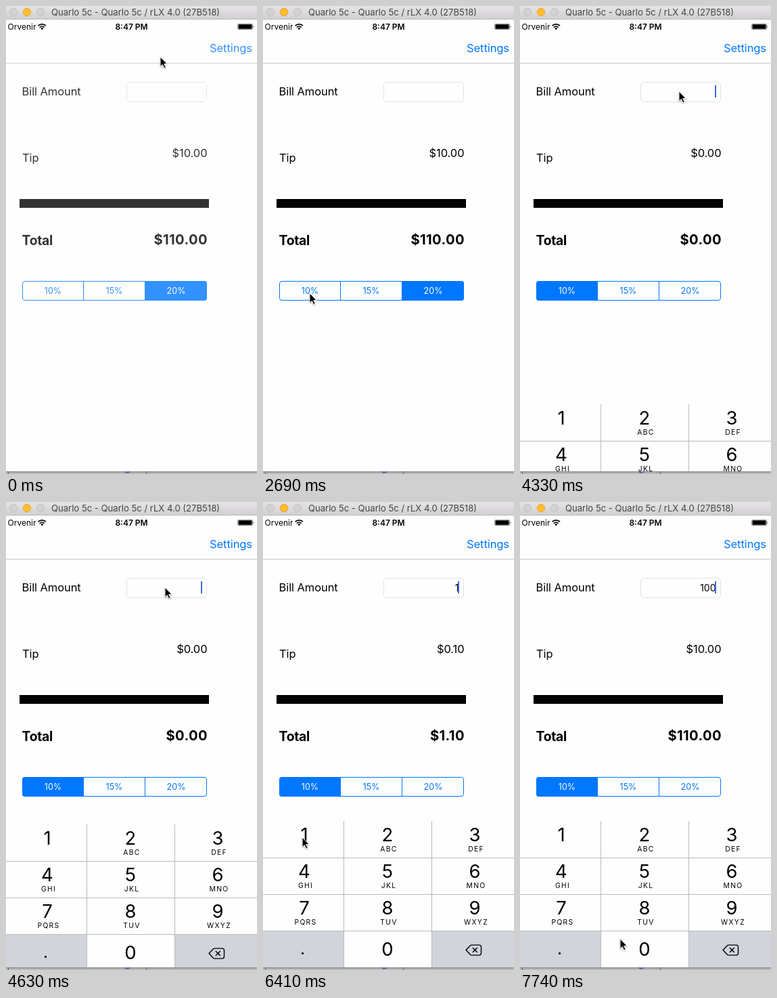
Write an HTML page that moves like this. It is 371 px wide and 691 px high and loops after 8 s.

```html
<!DOCTYPE html>
<html lang="en">
<head>
<meta charset="utf-8">
<title>Tip calculator</title>
<style>
  html, body { margin: 0; width: 100%; height: 100%; overflow: hidden; background: #fefefe; }
  svg { display: block; width: 371px; height: 691px; font-family: Inter, "Liberation Sans", sans-serif; }
  .label { font-size: 16.5px; letter-spacing: -.005em; }
  .total { font-size: 19.4px; font-weight: 700; letter-spacing: -.3px; }
  .sum { font-size: 20.2px; font-weight: 700; letter-spacing: .35px; }
  .end { text-anchor: end; }
  .mid, #segments text, #keys text { text-anchor: middle; }
  #segments text { font-size: 12.6px; }
  .digit { font-size: 27.5px; }
  .letters { font-size: 10.3px; letter-spacing: 1.3px; }
  #cursor { filter: drop-shadow(0 1px 1px rgba(0, 0, 0, .35)); }
</style>
</head>
<body>
<svg viewBox="0 0 371 691">
  <defs>
    <linearGradient id="chrome" x2="0" y2="1">
      <stop stop-color="#e6e4e6"/><stop offset="1" stop-color="#d0ced0"/>
    </linearGradient>
    <linearGradient id="desk" x2="0" y2="1">
      <stop stop-color="#8e8e8e"/><stop offset="1" stop-color="#c6c6c6"/>
    </linearGradient>
    <clipPath id="screen"><path d="M0 20H371V687H0z"/></clipPath>
    <clipPath id="pill"><rect x="24" y="406" width="273" height="29" rx="4"/></clipPath>
  </defs>
  <rect width="371" height="691" fill="#fefefe"/>

  <!-- window bar -->
  <rect width="371" height="20" fill="url(#chrome)"/>
  <path d="M0 19.5H371" stroke="#bcbabc"/>
  <g stroke-width=".8">
    <circle cx="11" cy="9" r="5.8" fill="#d3d1d3" stroke="#bdbbbd"/>
    <circle cx="31" cy="9" r="5.8" fill="#fdbc2e" stroke="#e0a127"/>
    <circle cx="51" cy="9" r="5.8" fill="#d3d1d3" stroke="#bdbbbd"/>
  </g>
  <text class="mid" x="191.5" y="14" font-size="13.1" fill="#454545">Quarlo 5c - Quarlo 5c / rLX 4.0 (27B518)</text>

  <!-- status bar -->
  <text x="2.5" y="35" font-size="12">Orvenir</text>
  <g fill="none" stroke="#000" stroke-width="1.7">
    <path d="M47.6 29.2a8 8 0 0 1 11.4 0M49.8 31.6a5 5 0 0 1 7 0"/>
    <path d="M53.3 35.2l-2-2.2a3 3 0 0 1 4 0z" fill="#000" stroke="none"/>
  </g>
  <text class="mid" x="185.5" y="34.5" font-size="12" font-weight="600">8:47 PM</text>
  <rect x="342.5" y="26.5" width="22" height="8" rx="1.5" fill="none" stroke="#000" stroke-opacity=".45"/>
  <rect x="343.5" y="27.3" width="20" height="6.4" rx=".8"/>
  <path d="M365.7 28.7q1.6 1.8 0 3.6z"/>

  <g id="content">
    <path d="M0 84.5H371" stroke="#c8c8c8"/>
    <text class="label end" x="364" y="68" fill="#0077ff">Settings</text>
    <text class="label" x="23.5" y="132">Bill Amount</text>
    <rect x="178.5" y="112.5" width="118" height="29" rx="4.5" fill="#fefefe" stroke="#e2e2e2"/>
    <text id="bill" class="end" x="289.5" y="131.5" font-size="14"></text>
    <rect id="caret" x="288" y="117" width="2" height="18" fill="#4168e8"/>
    <text class="label" x="24" y="230">Tip</text>
    <text id="tip" class="label end" x="297.5" y="222.5"></text>
    <rect x="20" y="285" width="280" height="13"/>
    <text class="total" x="23.5" y="353">Total</text>
    <text id="total" class="sum end" x="297.9" y="351.5"></text>
    <g id="segments">
      <g id="fills" clip-path="url(#pill)" fill="#0077ff"></g>
      <rect x="24.5" y="406.5" width="272" height="28" rx="3.5" fill="none" stroke="#0077ff"/>
      <path d="M114.5 406V435M205.5 406V435" stroke="#0077ff"/>
    </g>
  </g>

  <g clip-path="url(#screen)"><g id="keyboard">
    <rect y="471" width="371" height="216" fill="#fefefe"/>
    <path d="M0 633H119V687H0zM250 633H371V687H250z" fill="#d1d4db"/>
    <g id="keys"></g>
    <path d="M119.5 471V687M249.5 471V687M0 525.5H371M0 579.5H371M0 633.5H371" stroke="#b9babd"/>
    <path d="M300 661.5l6.3-6.5q.9-.9 2.2-.9h11q3 0 3 3v9q0 3-3 3h-11q-1.3 0-2.2-.9zM309.8 658l7 7M316.8 658l-7 7"
      fill="none" stroke="#000" stroke-width="1.4" stroke-linejoin="round"/>
  </g></g>

  <!-- strip of desktop below the window -->
  <rect y="687" width="371" height="4" fill="url(#desk)"/>
  <path d="M3.5 687V691M207.5 687V691" stroke="#666"/>
  <path d="M176 688q4 2 7-.5" fill="none" stroke="#5a3fb5" stroke-width="1.4"/>

  <path id="cursor" d="M0 0V14.6L3.3 11.5L5.8 16.8L8.2 15.7L5.7 10.6H10.2z" stroke="#fff"/>
</svg>
<script>
const LOOP = 8000, TICK = 149;
const $ = id => document.getElementById(id);

function add(parent, tag, attrs, text = '') {
  const node = document.createElementNS('http://www.w3.org/2000/svg', tag);
  for (const name in attrs) node.setAttribute(name, attrs[name]);
  node.textContent = text;
  parent.append(node);
  return node;
}

const segments = [[24, 114], [114, 205], [205, 297]].map(([left, right], i) => ({
  fill: add($('fills'), 'rect', { x: left, y: 406, width: right - left, height: 29 }),
  label: add($('segments'), 'text', { x: (left + right) / 2 + .5, y: 425 }, ['10%', '15%', '20%'][i]),
}));

// Number pad, three columns with slightly different widths
const columns = [[0, 119, 61], [120, 129, 184], [250, 121, 313]];
const letters = ['', 'ABC', 'DEF', 'GHI', 'JKL', 'MNO', 'PQRS', 'TUV', 'WXYZ'];
const pressed = {};
function addKey(digit, column, row, caption) {
  const [x, width, center] = columns[column], y = 471 + row * 54;
  pressed[digit] = add($('keys'), 'rect', { x, y, width, height: 54, fill: '#d1d4db', opacity: 0 });
  add($('keys'), 'text', { class: 'digit', x: center, y: y + (row < 3 ? 30 : 37) }, digit);
  add($('keys'), 'text', { class: 'letters', x: center + 2, y: y + 45 }, caption);
}
letters.forEach((caption, i) => addKey(i + 1, i % 3, Math.floor(i / 3), caption));
addKey(0, 1, 3, '');
add($('keys'), 'rect', { x: 57, y: 665, width: 3, height: 3, rx: .8 });

// Pointer waypoints: tick, x, y
const route = [
  [4, 228, 75], [8, 242, 126], [12, 242, 126], [16, 62, 453], [18, 69, 424],
  [21, 69, 424], [25, 226, 95], [27, 235, 126], [36, 235, 126],
  [39, 44, 543], [40, 58, 495], [43, 58, 495], [47, 144, 626], [48, 148, 645],
];
function pointerAt(tick) {
  const next = route.findIndex(point => point[0] > tick);
  if (next < 0) return route[route.length - 1].slice(1);
  if (next === 0) return route[0].slice(1);
  const [t0, x0, y0] = route[next - 1], [t1, x1, y1] = route[next];
  const u = (tick - t0) / (t1 - t0), ease = u * u * (3 - 2 * u);
  return [x0 + (x1 - x0) * ease, y0 + (y1 - y0) * ease];
}

function caretAt(tick) {
  if (tick < 29) return 0;
  if (tick >= 42) return 1;
  const phase = (tick - 29) % 7;
  return phase < 3 ? 1 : phase === 3 ? .4 : 0;
}

const money = amount => '$' + amount.toFixed(2);

function draw(ms) {
  const tick = Math.floor((ms % LOOP + 10) / TICK);
  const bill = tick < 43 ? '' : tick < 50 ? '1' : tick < 52 ? '10' : '100';
  const tip = tick < 21 ? 10 : bill * .1;
  const selected = tick < 21 ? 2 : 0;

  $('content').setAttribute('opacity', [.8, .92][tick] ?? 1);
  $('bill').textContent = bill;
  $('tip').textContent = money(tip);
  $('total').textContent = money(tick < 21 ? 110 : bill * 1.1);
  $('caret').setAttribute('opacity', caretAt(tick));

  segments.forEach(({ fill, label }, i) => {
    fill.setAttribute('opacity', i === selected ? 1 : i === 0 && tick === 20 ? .2 : 0);
    label.setAttribute('fill', i === selected ? '#fff' : '#0077ff');
  });

  const drop = tick < 29 ? 216 : Math.round(117 * .2 ** (tick - 29));
  $('keyboard').setAttribute('transform', `translate(0 ${drop})`);
  pressed[1].setAttribute('opacity', tick === 42 ? 1 : 0);
  pressed[0].setAttribute('opacity', tick === 49 || tick === 51 ? 1 : 0);
  $('cursor').setAttribute('transform', `translate(${pointerAt(tick).map(Math.round)})`);
}

const start = performance.now();
(function frame() {
  draw(performance.now() - start);
  requestAnimationFrame(frame);
})();
</script>
</body>
</html>
```
